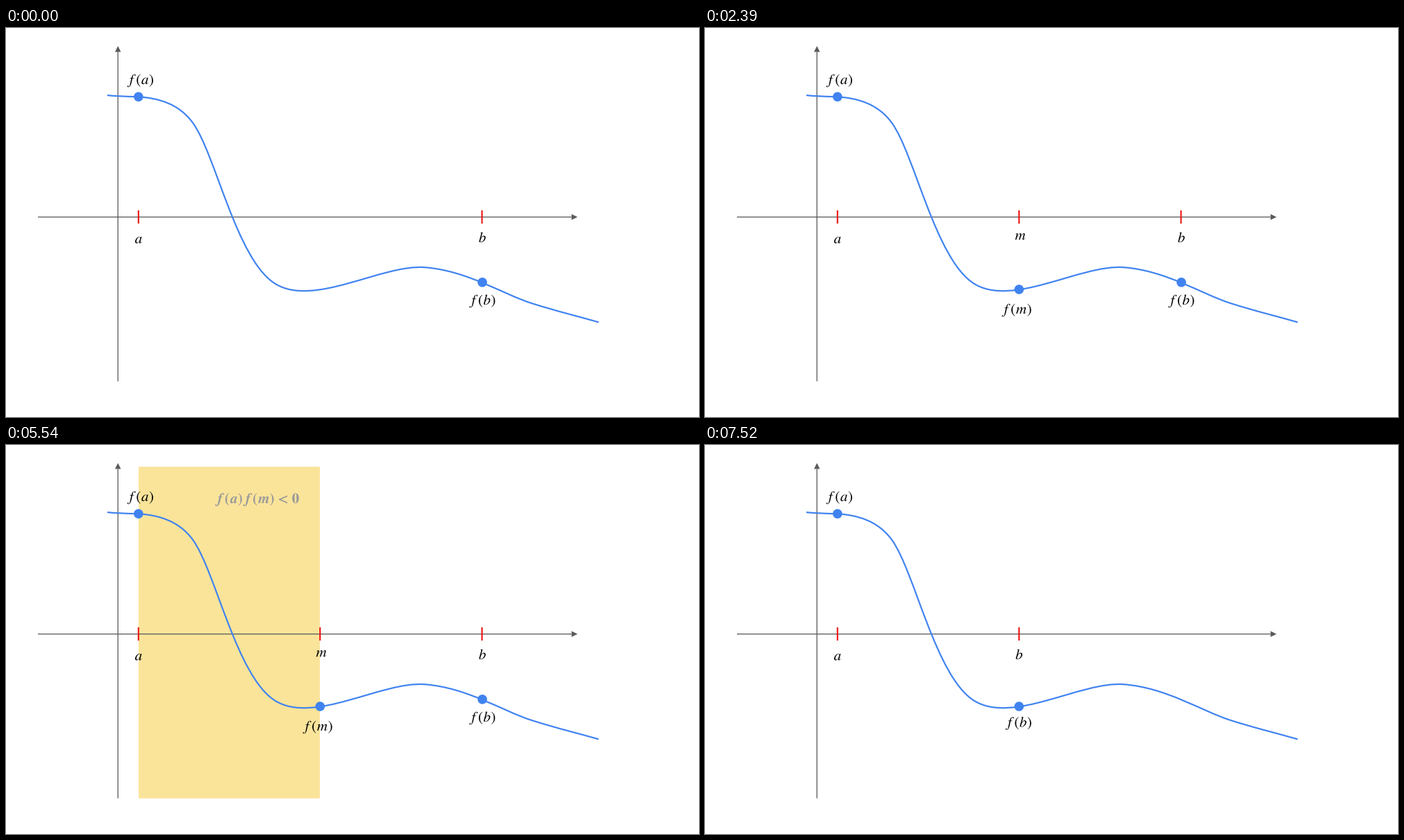
Recreate the animation shown at these times as a matplotlib script. Size 998 by 561 pixels, loop 8 s.

```python
import matplotlib.pyplot as plt
import numpy as np
from matplotlib.animation import FuncAnimation
from matplotlib.patches import Circle, PathPatch, Polygon, Rectangle
from matplotlib.path import Path
from matplotlib.textpath import TextPath
from matplotlib.transforms import Affine2D

W, H, DPI = 998, 561, 128
STEP, LOOP = 50, 8000
BLUE, GREY, RED, SAND = "#4083f0", "#595959", "#ee1111", "#fae49a"
AXIS_X, AXIS_Y = 161.2, 272.6
A, M, B = 190.8, 452.3, 685.5

plt.rcParams["mathtext.fontset"] = "stix"
fig = plt.figure(figsize=(W / DPI, H / DPI), dpi=DPI, facecolor="white")
ax = fig.add_axes([0, 0, 1, 1])
ax.set_xlim(0, W)
ax.set_ylim(H, 0)
ax.axis("off")


def px(n):
    return n * 72 / DPI


def line(xs, ys, color, width, z):
    return ax.plot(xs, ys, color=color, lw=px(width), zorder=z,
                   solid_capstyle="butt", snap=False)[0]


def axis(start, tip, head=8.5, half=4.2):
    start, tip = np.array(start), np.array(tip)
    along = (tip - start) / np.hypot(*(tip - start))
    side = half * along[::-1]
    neck = tip - head * along
    line(*zip(start, neck), GREY, 1.3, 2)
    ax.add_patch(Polygon([tip, neck + side, neck - side], fc=GREY, ec="none",
                         zorder=2))


def smooth_curve(points):
    """Handles run parallel to the neighbours' chord, capped on short spans."""
    p = np.array(points, float)
    handles = (p[2:] - p[:-2]) / 6
    knots = p[1:-1]
    verts = [knots[0]]
    for k, end in enumerate(knots[1:]):
        cap = 0.4 * np.hypot(*(end - knots[k]))
        out, back = (h * min(1, cap / np.hypot(*h)) for h in handles[k:k + 2])
        verts += [knots[k] + out, end - back, end]
    return verts


def math_text(chars, cx, base, color="black", bold=False, size=21, gap=1.6):
    """Set glyphs side by side by their ink, centred on cx."""
    style = r"\mathbfit" if bold else r"\mathit"
    upright = r"\mathbf" if bold else r"\mathrm"
    placed, x = [], 0
    for ch in chars:
        if ch == " ":
            x += 5.5
            continue
        kind = style if ch.isalpha() else upright
        path = TextPath((0, 0), f"${kind}{{{ch}}}$", size=size)
        box = path.get_extents()
        placed.append((path, x - box.x0))
        x += box.width + gap
    left = cx - (x - gap) / 2
    parts = []
    for path, dx in placed:
        place = Affine2D().scale(1, -1).translate(left + dx, base)
        patch = PathPatch(path.transformed(place), fc=color, ec="none",
                          zorder=6, snap=False)
        parts.append(ax.add_patch(patch))
    return parts


def tick(x):
    return [line([x, x], [263, 282], RED, 2.1, 3)]


def dot(x, y):
    return [ax.add_patch(Circle((x, y), 6.8, fc=BLUE, ec="none", zorder=5))]


axis((46, AXIS_Y), (823, AXIS_Y))
axis((AXIS_X, 509.5), (AXIS_X, 26))

# The first and last points only steer the ends of the curve
main = smooth_curve([(100, 125), (A, 99.2), (269, 136.7), (387.5, 368.7),
                     (603, 345.2), (757, 397), (853.5, 424.3), (950, 452)])
verts = [(146, 97), (157, 98.6)] + main
codes = [Path.MOVETO] + [Path.CURVE3] * 2 + [Path.CURVE4] * (len(main) - 1)
ax.add_patch(PathPatch(Path(verts, codes), fc="none", ec=BLUE, lw=px(2.2),
                       capstyle="butt", zorder=4))

# Left end of the interval stays throughout
tick(A)
dot(A, 99.2)
math_text("a", A, 310.5)
math_text("f(a)", 193.3, 81)

right_end = (tick(B) + dot(686, 366.8)
             + math_text("b", 686, 309) + math_text("f(b)", 685.8, 399))
middle_mark = tick(M) + dot(M, 377)
middle_text = math_text("m", 454, 305.5) + math_text("f(m)", 448.6, 412)
new_end = math_text("b", M, 309) + math_text("f(b)", 451.3, 406.5)
band = [ax.add_patch(Rectangle((191, 31.4), 261, 478.2, fc=SAND, ec="none",
                               zorder=1, snap=False))]
band += math_text("f(a)f(m) < 0", 361.5, 84, "#999999", bold=True)

# Each group with the time span in which it shows
spans = [(middle_mark, 500, LOOP), (middle_text, 500, 6800),
         (band, 3650, 6800), (right_end, 0, 6800), (new_end, 6800, LOOP)]


def draw(i):
    for parts, start, end in spans:
        for part in parts:
            part.set_visible(start <= i * STEP < end)
    return []


anim = FuncAnimation(fig, draw, frames=LOOP // STEP, interval=STEP,
                     repeat=True, repeat_delay=0)
plt.show()
```
